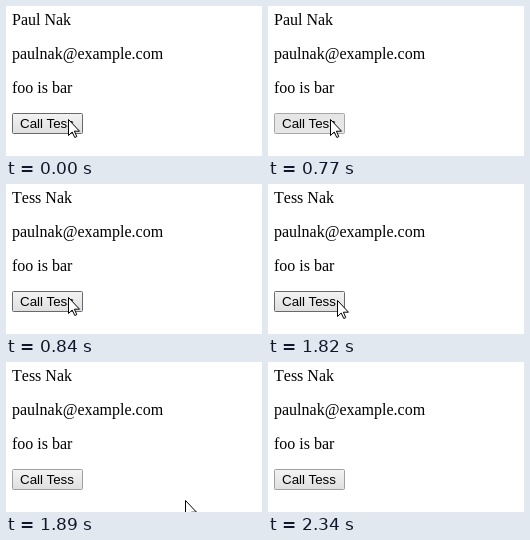
Write an HTML page that moves like this. It is 256 px wide and 150 px high and loops after 2590 ms.

```html
<!DOCTYPE html>
<html lang="en">
<head>
<meta charset="utf-8">
<title>Call button</title>
<style>
  html, body { margin: 0; width: 100%; height: 100%; overflow: hidden; background: #fff; }
  svg { display: block; width: 256px; height: 150px; }
  text { font: 16px "Liberation Serif", "Times New Roman", serif; font-kerning: none; }
  #label { font: 13.333px "Liberation Sans", Arial, sans-serif; text-anchor: middle; }
  .idle { fill: url(#raised); stroke: #a0a0a0; }
  .hover { fill: url(#raised); stroke: #666a6c; }
  .pressed { fill: #e6e6e6; stroke: #a8a8a8; }
</style>
</head>
<body>
<svg viewBox="0 0 256 150">
  <linearGradient id="raised" x2="0" y2="1">
    <stop stop-color="#f3f3f3"/><stop offset="1" stop-color="#dfdfdf"/>
  </linearGradient>
  <text id="name" x="6" y="19"></text>
  <text x="6" y="53">paulnak@example.com</text>
  <text x="6" y="87">foo is bar</text>
  <rect id="button" x="6.5" y="107.5" width="70" height="20" rx="1"/>
  <text id="label" x="41" y="122">Call Tess</text>
  <path id="cursor" d="M.5 .5V16.5L4.2 13L6.8 18.5L8.8 17.6L6.4 12.2H11.5Z" fill="#fff" stroke="#000"/>
</svg>
<script>
  const LOOP = 2590, PRESS = 770, RELEASE = 840, MOVE = 1820, LEAVE = 1890, GONE = 1960;
  const [nameText, button, cursor] =
    ["name", "button", "cursor"].map(id => document.getElementById(id));

  function draw(t) {
    const look = t >= LEAVE ? "idle" : t >= PRESS && t < RELEASE ? "pressed" : "hover";
    const [x, y] = t < MOVE ? [62, 113] : t < LEAVE ? [69, 116] : [179, 138];
    nameText.textContent = t < RELEASE ? "Paul Nak" : "Tess Nak";
    button.setAttribute("class", look);
    cursor.setAttribute("transform", `translate(${x} ${y})`);
    cursor.setAttribute("visibility", t < GONE ? "visible" : "hidden");
  }

  const start = performance.now();
  function tick() {
    draw((performance.now() - start) % LOOP);
    requestAnimationFrame(tick);
  }
  tick();
</script>
</body>
</html>
```
